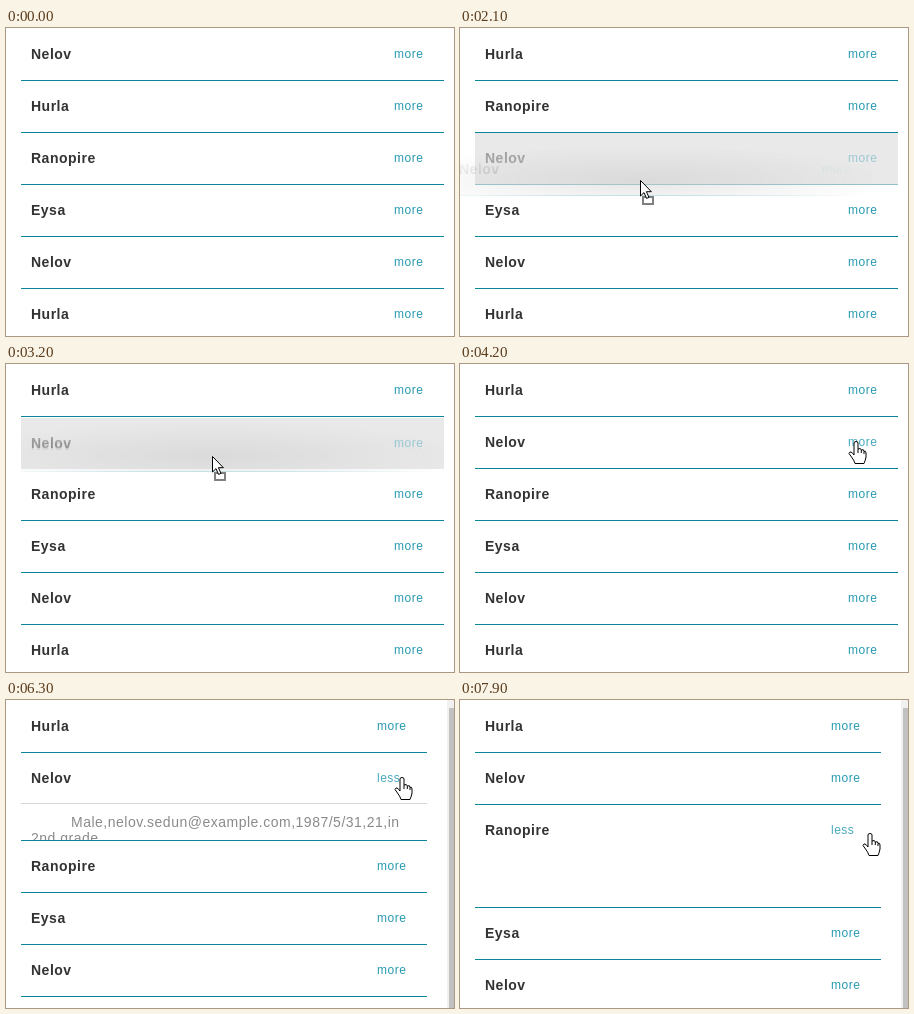
An HTML page with a canvas that plays this animation: 448 by 308 pixels, repeating every 8 s.

```html
<!DOCTYPE html>
<html lang="en">
<head>
<meta charset="utf-8">
<title>Sortable list</title>
<style>
  html, body { margin: 0; width: 100%; height: 100%; overflow: hidden; background: #fff; }
  canvas { display: block; width: 448px; height: 308px; }
</style>
</head>
<body>
<canvas id="stage" width="448" height="308"></canvas>
<script>
const LOOP = 8000, STEP = 100, ROW = 52, LEFT = 15;
const DRAG_START = 1700, DROP = 3500, SLIDE = 150, LAG = 10;
const PANEL_TIME = 290;
const GRIP = { x: 191, y: 36 };
const TEAL = '#0b8598', LINK = '#279ab0', SHADE = '#c8c8c8';
const FONT = '"Liberation Sans", Arial, sans-serif';
const names = ['Nelov', 'Hurla', 'Ranopire', 'Eysa', 'Nelov', 'Hurla'];
const details = ['Male,nelov.sedun@example.com,1987/5/31,21,in', '2nd grade'];

// Resting points of the pointer: time, x, y
const stops = [
  [200, 440, 220], [700, 150, 92], [1000, 192, 36], [1500, 206, 36], [1600, 206, 36],
  [2100, 180, 152], [2520, 196, 228], [2800, 194, 132], [3200, 206, 92], [3500, 206, 92],
  [4200, 396, 77], [6800, 396, 77], [7300, 408, 134], [7500, 410, 133]
];

const stage = document.getElementById('stage').getContext('2d');

const clamp = v => Math.max(0, Math.min(1, v));
const easeOut = v => 1 - (1 - clamp(v)) ** 2;
const smooth = v => v * v * (3 - 2 * v);

function pointerAt(t) {
  if (t < stops[0][0]) return null;
  const n = stops.findIndex(s => s[0] > t);
  const [t1, x1, y1] = stops.at(n);
  if (n < 0) return { x: x1, y: y1 };
  const [t0, x0, y0] = stops[n - 1];
  const p = smooth((t - t0) / (t1 - t0));
  return { x: Math.round(x0 + (x1 - x0) * p), y: Math.round(y0 + (y1 - y0) * p) };
}

// The dragged row takes whichever slot the pointer enters
function findMoves() {
  const moves = [];
  let slot = 0;
  for (let t = DRAG_START; t < DROP; t += 10) {
    const under = Math.floor(pointerAt(t).y / ROW);
    if (under !== slot) moves.push({ start: t, slot: slot = under });
  }
  return moves;
}

const moves = findMoves();

function slotOf(i, t) {
  let pos = i;
  for (const { start, slot } of moves) {
    const target = i === 0 ? slot : i <= slot ? i - 1 : i;
    const lag = i === 0 ? LAG : 0;
    pos += (target - pos) * easeOut((t - start - lag) / SLIDE);
  }
  return pos;
}

// Open panel: its item, height and text opacity
function panelAt(t) {
  const grow = start => easeOut((t - start) / PANEL_TIME);
  if (t >= 7650) return { item: 2, h: Math.round(ROW * grow(7650)), alpha: 0 };
  const closed = grow(6250);
  return {
    item: 0,
    h: Math.round(ROW * grow(4350) * (1 - closed)),
    alpha: clamp((t - 4600) / 400) * (1 - closed)
  };
}

function text(c, str, x, y, size, color, weight = '') {
  c.font = `${weight} ${size}px ${FONT}`;
  c.letterSpacing = '0.5px';
  c.fillStyle = color;
  c.fillText(str, x, y);
}

function box(c, color, x, y, w, h) {
  c.fillStyle = color;
  c.fillRect(x, y, w, h);
}

function drawRow(c, name, x, y, width, { bg = '#fff', label = 'more', dim = 1, extra = 0 } = {}) {
  const height = ROW + extra, alpha = c.globalAlpha;
  box(c, bg, x, y, width, height);
  text(c, name, x + 10, y + 30, 14, '#333', 'bold');
  c.globalAlpha = alpha * dim;
  text(c, label, x + width - 50, y + 29, 12, LINK);
  c.globalAlpha = alpha;
  box(c, TEAL, x, y + height - 1, width, 1);
}

function drawPanel(y, width, panel) {
  stage.save();
  stage.beginPath();
  stage.rect(LEFT, y + 50, width, panel.h + 1);
  stage.clip();
  stage.globalAlpha = panel.alpha;
  box(stage, '#c6c6c6', LEFT, y + 50, width, 1);
  text(stage, details[0], LEFT + 50, y + 74, 14, '#555');
  text(stage, details[1], LEFT + 10, y + 90, 14, '#555');
  stage.restore();
}

// Copy of the row that fades out around the grip point
function makeGhost() {
  const canvas = document.createElement('canvas');
  const width = canvas.width = 423, radius = 34;
  canvas.height = ROW;
  const c = canvas.getContext('2d');
  drawRow(c, names[0], 0, 0, width, { bg: SHADE });
  c.globalCompositeOperation = 'destination-in';
  c.translate(GRIP.x, GRIP.y);
  c.scale(7.4, 1);
  const glow = c.createRadialGradient(0, 0, 0, 0, 0, radius);
  glow.addColorStop(0, 'rgba(0,0,0,0.45)');
  glow.addColorStop(1, 'rgba(0,0,0,0)');
  box(c, glow, -width, -ROW, 2 * width, 2 * ROW);
  return canvas;
}

const ghost = makeGhost();
const arrow = new Path2D('M.5.5V16L4 12.6L6.6 18.4L9 17.4L6.4 11.7H11.4Z');
const hand = new Path2D('M-2 14V2Q-2 .5 0 .5T2 2V8Q5 6.5 5.3 9Q8 7.8 8 10.3Q10 9.5 10 12V16' +
  'Q9.5 19 8 22.5H-1Q-2 19-4.5 16L-7 12.5Q-6.3 9.8-4 11.5Z');
const knuckles = new Path2D('M2 8V12M5.3 9V12M8 10.3V13');

function drawPointer({ x, y }, kind) {
  const shape = kind === 'hand' ? hand : arrow;
  stage.save();
  stage.translate(x, y);
  stage.strokeStyle = '#000';
  if (kind === 'drag') {
    box(stage, '#fff', 2, 16, 12, 9);
    stage.setLineDash([1, 1]);
    stage.strokeRect(2.5, 16.5, 11, 8);
    stage.strokeRect(3.5, 17.5, 9, 6);
    stage.setLineDash([]);
  }
  stage.fillStyle = '#fff';
  stage.fill(shape);
  stage.stroke(shape);
  if (kind === 'hand') stage.stroke(knuckles);
  stage.restore();
}

function draw(t) {
  box(stage, '#fff', 0, 0, 448, 308);
  const dragging = t >= DRAG_START && t < DROP;
  const panel = panelAt(t);
  const open = panel.h > 0;
  const width = open ? 406 : 423;
  const pointer = pointerAt(t);
  const overLink = pointer && pointer.x > 385 && pointer.x < 420 &&
    Math.abs(pointer.y % ROW - 26) < 14;
  const hoverRow = overLink ? Math.floor(pointer.y / ROW) : -1;
  const openSlot = slotOf(panel.item, t);

  // The dragged row is first, so its neighbours slide over it
  names.forEach((name, i) => {
    const slot = slotOf(i, t);
    const isOpen = open && i === panel.item;
    const y = Math.round(slot * ROW) + 1 + (open && slot > openSlot ? panel.h : 0);
    const held = dragging && i === 0;
    stage.globalAlpha = held ? 0.4 : 1;
    drawRow(stage, name, LEFT, y, width, {
      bg: held ? SHADE : '#fff',
      label: isOpen ? 'less' : 'more',
      dim: isOpen || Math.round(slot) === hoverRow ? 0.85 : 1,
      extra: isOpen ? panel.h : 0
    });
    stage.globalAlpha = 1;
    if (isOpen) drawPanel(y, width, panel);
  });

  if (open) {
    box(stage, '#f1f1f1', 441, 0, 7, 308);
    box(stage, '#c1c1c1', 443, 8, 5, 300);
  }
  if (dragging) stage.drawImage(ghost, pointer.x - GRIP.x, pointer.y - GRIP.y);
  if (pointer) drawPointer(pointer, dragging ? 'drag' : overLink ? 'hand' : 'arrow');
}

function frame() {
  const t = performance.now() % LOOP;
  draw(Math.floor(t / STEP) * STEP);
  requestAnimationFrame(frame);
}

frame();
</script>
</body>
</html>
```
